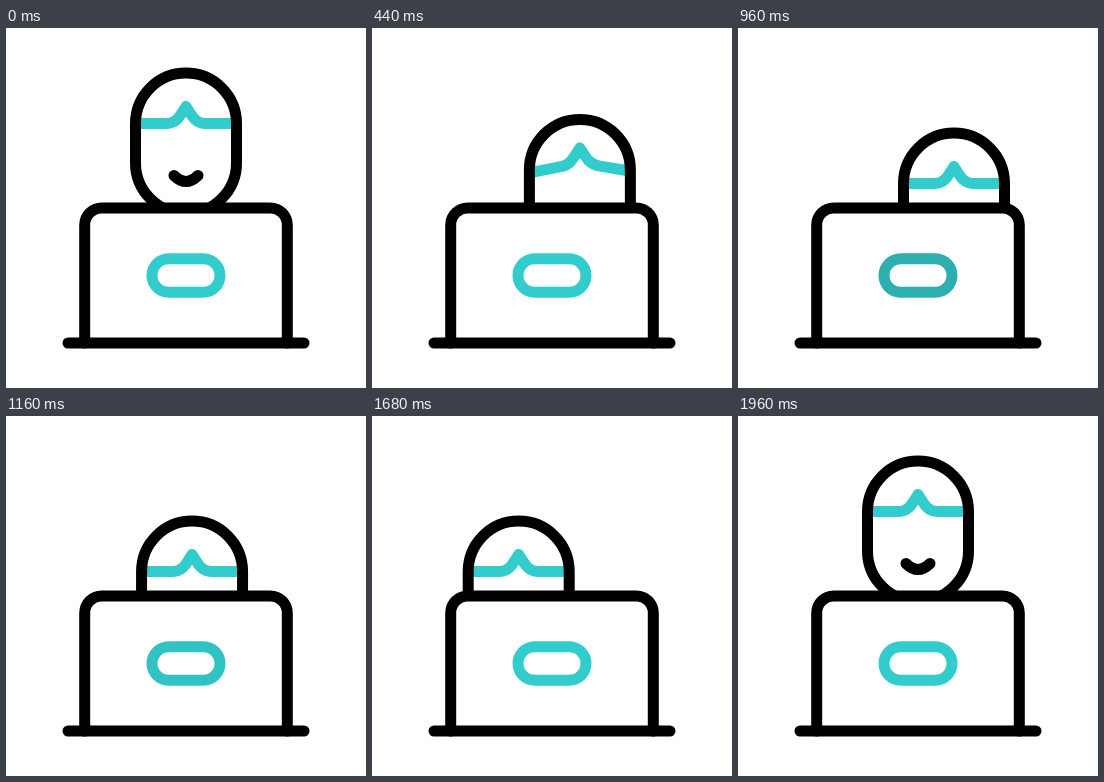
An HTML page with a canvas for the animation above (2000 ms loop, 360x360 px).

```html
<!DOCTYPE html>
<html lang="en">
<head>
<meta charset="utf-8">
<title>Peeking over a laptop</title>
<style>
html, body { margin: 0; width: 100%; height: 100%; overflow: hidden; background: #fff; }
canvas { display: block; width: 360px; height: 360px; }
</style>
</head>
<body>
<canvas id="stage" width="360" height="360"></canvas>
<script>
const ctx = document.getElementById('stage').getContext('2d');
const LOOP = 2000, STEP = 40;
const BLACK = '#000', TEAL = [51, 204, 204], DARK = [46, 175, 175];
const CENTER = 180, RIGHT = 216, LEFT = 146.7, DROP = 60;

const span = (t, a, b) => Math.min(1, Math.max(0, (t - a) / (b - a)));
const smooth = u => u * u * (3 - 2 * u);
const mix = (a, b, u) => a + (b - a) * u;
const rgb = (a, b, u) => `rgb(${a.map((v, i) => Math.round(mix(v, b[i], u))).join()})`;

function stroke(color, draw) {
  ctx.beginPath();
  draw();
  ctx.strokeStyle = color;
  ctx.stroke();
}

function pose(t) {
  const down = span(t, 80, 600);
  const across = smooth(span(t, 960, 1400));
  const up = span(t, 1680, 1920);
  const d = smooth(down), u = smooth(up);
  const x = up > 0 ? mix(LEFT, CENTER, u) : mix(mix(CENTER, RIGHT, d), LEFT, across);
  return {
    x,
    y: DROP * (d - u),
    tilt: Math.sin(Math.PI * down) + Math.sin(Math.PI * up)
  };
}

// k is how far the face looks up
function drawHead({ x, y, tilt: k }) {
  ctx.save();
  ctx.translate(x, y);

  stroke(rgb(TEAL, TEAL, 0), () => {
    const peak = 78.5 - 6 * k, l = 95.5 - 4 * k, r = 95.5 - 5 * k;
    ctx.moveTo(-48, 95.5 + 3 * k);
    ctx.lineTo(-19, l);
    ctx.bezierCurveTo(-9, l - 2 * k, -6, peak + 9, 0, peak);
    ctx.bezierCurveTo(6, peak + 9, 9, r - 2 * k, 19, r);
    ctx.lineTo(48, 95.5 + k);
  });

  stroke(BLACK, () => {
    ctx.arc(0, 95.5, 50.5, Math.PI, 0);
    ctx.lineTo(50.5, 135);
    ctx.arc(0, 135, 50.5, 0, Math.PI);
    ctx.closePath();
  });

  stroke(BLACK, () => {
    const w = 12 + 2 * k, top = 147.5 - 8.5 * k;
    ctx.moveTo(-w, top);
    ctx.quadraticCurveTo(0, top + 12 - 3.5 * k, w, top);
  });
  ctx.restore();
}

function drawLaptop(t) {
  ctx.beginPath();
  ctx.moveTo(78.7, 315);
  ctx.lineTo(78.7, 197);
  ctx.arcTo(78.7, 180, 96, 180, 17);
  ctx.lineTo(264, 180);
  ctx.arcTo(281.3, 180, 281.3, 197, 17);
  ctx.lineTo(281.3, 315);
  ctx.fillStyle = '#fff';
  ctx.fill();
  ctx.strokeStyle = BLACK;
  ctx.stroke();

  stroke(BLACK, () => {
    ctx.moveTo(62, 315);
    ctx.lineTo(298, 315);
  });

  const pulse = (1 - Math.cos(2 * Math.PI * span(t, 640, 1280))) / 2;
  stroke(rgb(TEAL, DARK, pulse), () => {
    ctx.arc(162.7, 247.5, 16.7, Math.PI / 2, Math.PI * 1.5);
    ctx.arc(197.3, 247.5, 16.7, -Math.PI / 2, Math.PI / 2);
    ctx.closePath();
  });
}

function frame(now) {
  const t = Math.floor((now % LOOP) / STEP) * STEP;
  ctx.fillStyle = '#fff';
  ctx.fillRect(0, 0, 360, 360);
  ctx.lineWidth = 11;
  ctx.lineCap = ctx.lineJoin = 'round';
  drawHead(pose(t));
  drawLaptop(t);
}

const start = performance.now();
function tick() {
  frame(performance.now() - start);
  requestAnimationFrame(tick);
}
tick();
</script>
</body>
</html>
```
